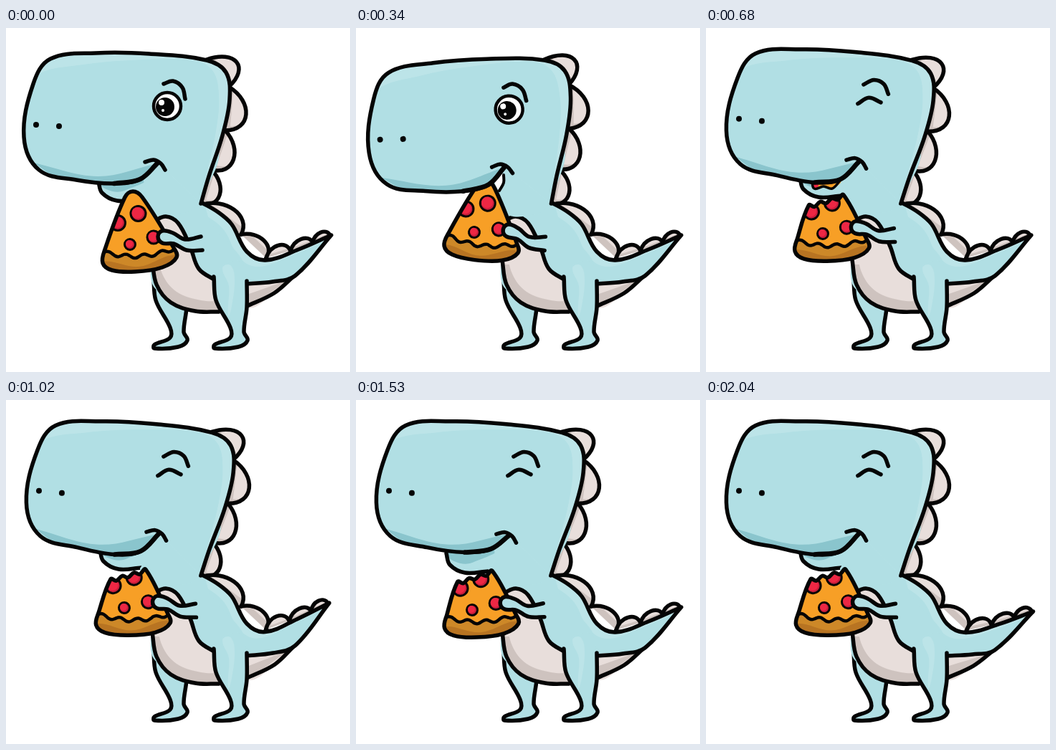
Write an HTML page with a canvas that moves like this. It is 480 by 480 pixels and loops after 2210 ms.

```html
<!DOCTYPE html>
<html lang="en">
<head>
<meta charset="utf-8">
<title>Dinosaur eating pizza</title>
<style>
html, body { margin: 0; width: 100%; height: 100%; overflow: hidden; background: #fff; }
canvas { display: block; width: 480px; height: 480px; }
</style>
</head>
<body>
<canvas id="stage" width="480" height="480"></canvas>
<script>
const ctx = document.getElementById('stage').getContext('2d');
const STEP = 170, STEPS = 13, FIRST_CHEW = 4, LEG_GAP = 84;
const INK = '#050505', BLUE = '#b1dfe4', LIGHT = '#bce4e8', TEAL = '#8ac5cd';
const BEIGE = '#e8dedb', TAUPE = '#cec3bf', CHEESE = '#f79f26', CRUST = '#cd8828';
const CRUST_DIM = '#b87422', RED = '#ed2744', RED_DIM = '#c81d3b';
const NECK = [272, 240], SLICE = [173, 302], TAIL_ROOT = [345, 340];
const rad = deg => deg * Math.PI / 180;
const clamp01 = v => Math.max(0, Math.min(1, v));

// The head tips down into a bite for four steps, then chews on every other step.
function poseAt(step) {
  if (step < FIRST_CHEW) {
    const lift = Math.min(1, step / 2);
    return { head: -2.53 * step, slice: [-8 * lift, -17 * lift, 10 * lift],
      tail: 0, jaw: [0, 0], sag: 0, smile: 0, biting: step > 1 };
  }
  const open = step % 2 === 0, first = step === FIRST_CHEW;
  return { head: 2.1, happy: true, morsel: first,
    slice: first ? [-10, -15, 2] : open ? [-8, -12, 3] : [-11, -9, 1],
    tail: !open || first ? 0 : step === FIRST_CHEW + 2 ? -3.1 : 3.1,
    jaw: open ? [2, -5] : [-3, 0], sag: open ? 3 : 0, smile: open ? 0 : 3 };
}

// Smooth curve through flat x,y pairs; a repeated point makes a corner.
function curve(flat, closed, map = p => p) {
  const pts = [];
  for (let i = 0; i < flat.length; i += 2) pts.push(map([flat[i], flat[i + 1]]));
  const n = pts.length, path = new Path2D();
  const at = i => closed ? pts[(i + n) % n] : pts[Math.max(0, Math.min(n - 1, i))];
  const handle = (i, reach) => {
    const dx = at(i + 1)[0] - at(i - 1)[0], dy = at(i + 1)[1] - at(i - 1)[1];
    const k = reach / (Math.hypot(dx, dy) || 1);
    return [at(i)[0] + dx * k, at(i)[1] + dy * k];
  };
  path.moveTo(...pts[0]);
  for (let i = 0; i < (closed ? n : n - 1); i++) {
    const [b, c] = [at(i), at(i + 1)];
    const reach = Math.hypot(c[0] - b[0], c[1] - b[1]) * 0.35;
    path.bezierCurveTo(...handle(i, reach), ...handle(i + 1, -reach), ...c);
  }
  return path;
}
function fill(color, flat, map) {
  ctx.fillStyle = color;
  ctx.fill(curve(flat, true, map));
}
function line(flat, map, width = 5.5) {
  ctx.lineWidth = width;
  ctx.stroke(curve(flat, false, map));
}
function disc(x, y, r, color, outline = 0) {
  ctx.beginPath();
  ctx.arc(x, y, r, 0, Math.PI * 2);
  ctx.fillStyle = color;
  ctx.fill();
  if (outline) { ctx.lineWidth = outline; ctx.stroke(); }
}
function turned(angle, [x, y], draw) {
  ctx.save();
  ctx.translate(x, y);
  ctx.rotate(rad(angle));
  ctx.translate(-x, -y);
  draw();
  ctx.restore();
}
function clipped(path, draw) {
  ctx.save();
  ctx.clip(path);
  draw();
  ctx.restore();
}

// A row of rounded spikes, one between each pair of neighbouring base points.
function spikes(bases, height, map = p => p) {
  for (let i = 0; i < bases.length - 1; i++) {
    const [ax, ay] = map(bases[i]), [bx, by] = map(bases[i + 1]);
    const dx = bx - ax, dy = by - ay, k = height(i) * 4 / 3 / Math.hypot(dx, dy);
    const knob = t => [ax + dx * t + dy * k, ay + dy * t - dx * k];
    const path = new Path2D();
    path.moveTo(ax, ay);
    path.bezierCurveTo(...knob(0.3), ...knob(0.95), bx, by);
    ctx.fillStyle = TAUPE;
    ctx.fill(path);
    clipped(path, () => {
      ctx.translate(7, -6);
      ctx.fillStyle = BEIGE;
      ctx.fill(path);
    });
    ctx.lineWidth = 5.5;
    ctx.stroke(path);
  }
}
function bend(tail) {
  return ([x, y]) => {
    const a = rad(tail) * clamp01((x - 340) / 50), [cx, cy] = TAIL_ROOT;
    const dx = x - cx, dy = y - cy;
    return [cx + dx * Math.cos(a) - dy * Math.sin(a), cy + dx * Math.sin(a) + dy * Math.cos(a)];
  };
}

function jaw([dx, dy]) {
  const map = ([x, y]) => [x + dx, y + dy];
  const rim = [129, 214, 134, 230, 155, 241, 187, 239];
  fill(BLUE, [...rim, 205, 205], map);
  fill(TEAL, [130, 212, 140, 225, 165, 227, 205, 200], map);
  line(rim, map);
}

function leg() {
  const rim = [206, 347, 209, 380, 229, 418, 229, 432, 207, 442, 207, 447,
    240, 445, 253, 436, 248, 424, 252, 390, 252, 353];
  fill(BLUE, [...rim, 240, 325]);
  line(rim);
}

function torso(tail) {
  const map = bend(tail);
  spikes([[272, 247], [328, 288], [363, 321], [397, 311], [428, 299], [452, 289]],
    i => 22 / (1 + 0.4 * i), map);

  const under = [402, 346, 374, 370, 334, 389];
  fill(BEIGE, [402, 346, ...under, 330, 345, 330, 345], map);
  fill(TAUPE, [396, 351, 396, 351, 336, 387, 336, 372, 336, 372], map);
  line(under, map);

  leg();

  const back = [272, 243, 296, 257, 315, 274, 336, 312, 362, 324, 408, 309, 454, 289, 454, 289,
    403, 346, 372, 354, 334, 357];
  const body = curve([...back, 325, 388, 265, 396, 215, 368, 202, 300, 187, 235, 187, 235,
    215, 200, 272, 240], true, map);
  ctx.fillStyle = LIGHT;
  ctx.fill(body);
  clipped(body, () => {
    ctx.translate(-10, 9);
    ctx.fillStyle = BLUE;
    ctx.fill(body);
  });
  fill(BLUE, [190, 235, 268, 238, 285, 270, 330, 350, 215, 368, 202, 300]);
  line(back, map);

  const lobe = [207, 269, 223, 263, 240, 272, 257, 305, 269, 336, 292, 352];
  const base = [297, 396, 264, 395, 230, 383, 210, 358, 204, 324];
  const belly = curve([...lobe, 292, 352, 297, 396, ...base], true);
  ctx.fillStyle = TAUPE;
  ctx.fill(belly);
  clipped(belly, () => {
    ctx.translate(8, -15);
    ctx.fillStyle = BEIGE;
    ctx.fill(belly);
    ctx.fillRect(190, 270, 90, 75);
  });
  line(base);
  line(lobe);

  ctx.save();
  ctx.translate(LEG_GAP, 0);
  leg();
  fill(LIGHT, [218, 335, 229, 331, 235, 350, 231, 388, 226, 402, 227, 360]);
  ctx.restore();
}

function slice(bitten) {
  const top = bitten ? [] : [166, 236, 177, 228, 190, 236];
  for (let i = 0; bitten && i < 7; i++)
    top.push(152 + 8 * i, 265 - 2.7 * i + (i % 2 ? 2.5 : -2));
  const path = curve([...top, 233, 305, 238, 320, 218, 334, 180, 340, 148, 338, 135, 328, 138, 309], true);
  const wave = [];
  for (let t = 0; t <= 1.001; t += 1 / 24)
    wave.push(136 + 99 * t, 313 - 5 * t + 8 * Math.sin(Math.PI * t) + 2.5 * Math.sin(8 * Math.PI * t + 3));

  ctx.fillStyle = CHEESE;
  ctx.fill(path);
  clipped(path, () => {
    for (const [x, y, r] of [[156, 272, 10.5], [184.5, 259, 10.5], [173, 302, 7.5], [206, 292, 9]]) {
      disc(x, y, r, RED_DIM, 3);
      disc(x - 1, y - 1, r - 2.5, RED);
    }
    fill(CRUST, [...wave, 245, 345, 130, 345]);
    fill(CRUST_DIM, [130, 327, 185, 333, 242, 318, 245, 350, 130, 350]);
    line(wave, undefined, 4.5);
  });
  ctx.lineWidth = 5.5;
  ctx.stroke(path);
}

function arm() {
  const rim = [272, 291, 250, 295, 233, 286, 218, 283, 212, 291, 218, 300, 234, 301, 252, 310, 274, 310];
  fill(BLUE, rim);
  line(rim);
}

function morsel() {
  const rim = [148, 213, 151, 224, 164, 221, 176, 224, 187, 213];
  fill(CHEESE, rim);
  disc(153, 219, 4, RED);
  line(rim, undefined, 3.5);
}

function toothGap() {
  const edge = [206, 205, 206, 216, 200, 227];
  fill('#fff', [194, 205, ...edge]);
  line(edge, undefined, 4);
}

function head({ happy, sag, smile }) {
  const mouth = [151, 217 + sag, 187, 211 + sag, 212, 188 + smile];
  const outline = [272, 245, 283, 207, 302, 150, 312, 100, 307, 62, 280, 45, 200, 36, 125, 35, 62, 43,
    38, 78, 25, 152, 46, 198, 98, 212, ...mouth];
  const path = curve(outline);
  ctx.fillStyle = LIGHT;
  ctx.fill(path);
  clipped(path, () => {
    ctx.fillStyle = BLUE;
    turned(-6, NECK, () => ctx.fill(path));
    fill(TEAL, [38, 188, 38, 188, 128, 207, 207, 190, 207, 190, 190, 222, 90, 218]);
  });
  line(outline);
  line(mouth, undefined, 6.5);
  line([194, 187 + smile, 206, 184 + smile, 216, 189 + smile, 222, 198 + smile]);

  disc(42, 135, 4, INK);
  disc(74, 137, 4, INK);
  if (happy) {
    line([214, 81, 228, 74, 242, 79, 249, 93]);
    line([207, 108, 222, 99, 239, 105]);
  } else {
    line([220, 78, 233, 74, 246, 83, 250, 99]);
    disc(225, 109, 19, '#fff', 4.5);
    disc(222, 110, 13, INK);
    disc(217, 104, 4, '#fff');
    disc(219, 115, 2, '#fff');
  }
}

function draw(pose) {
  const [dx, dy, angle] = pose.slice;
  const held = part => {
    ctx.save();
    ctx.translate(dx, dy);
    turned(angle, SLICE, part);
    ctx.restore();
  };
  ctx.fillStyle = '#fff';
  ctx.fillRect(0, 0, 480, 480);
  ctx.strokeStyle = INK;
  ctx.lineCap = ctx.lineJoin = 'round';
  turned(pose.head, NECK, () =>
    spikes([[280, 44], [311, 82], [306, 143], [287, 198], [272, 246]], i => 30 - 3 * i));
  if (!pose.biting) jaw(pose.jaw);
  torso(pose.tail);
  turned(pose.head, NECK, () =>
    fill(BLUE, [190, 205, 190, 205, 212, 188, 290, 160, 272, 245, 272, 245, 250, 258, 205, 252]));
  if (pose.morsel) morsel();
  if (pose.biting) toothGap();
  held(() => slice(pose.happy));
  turned(pose.head, NECK, () => head(pose));
  held(arm);
}

function tick() {
  draw(poseAt(Math.floor(performance.now() / STEP) % STEPS));
  requestAnimationFrame(tick);
}
tick();
</script>
</body>
</html>
```
